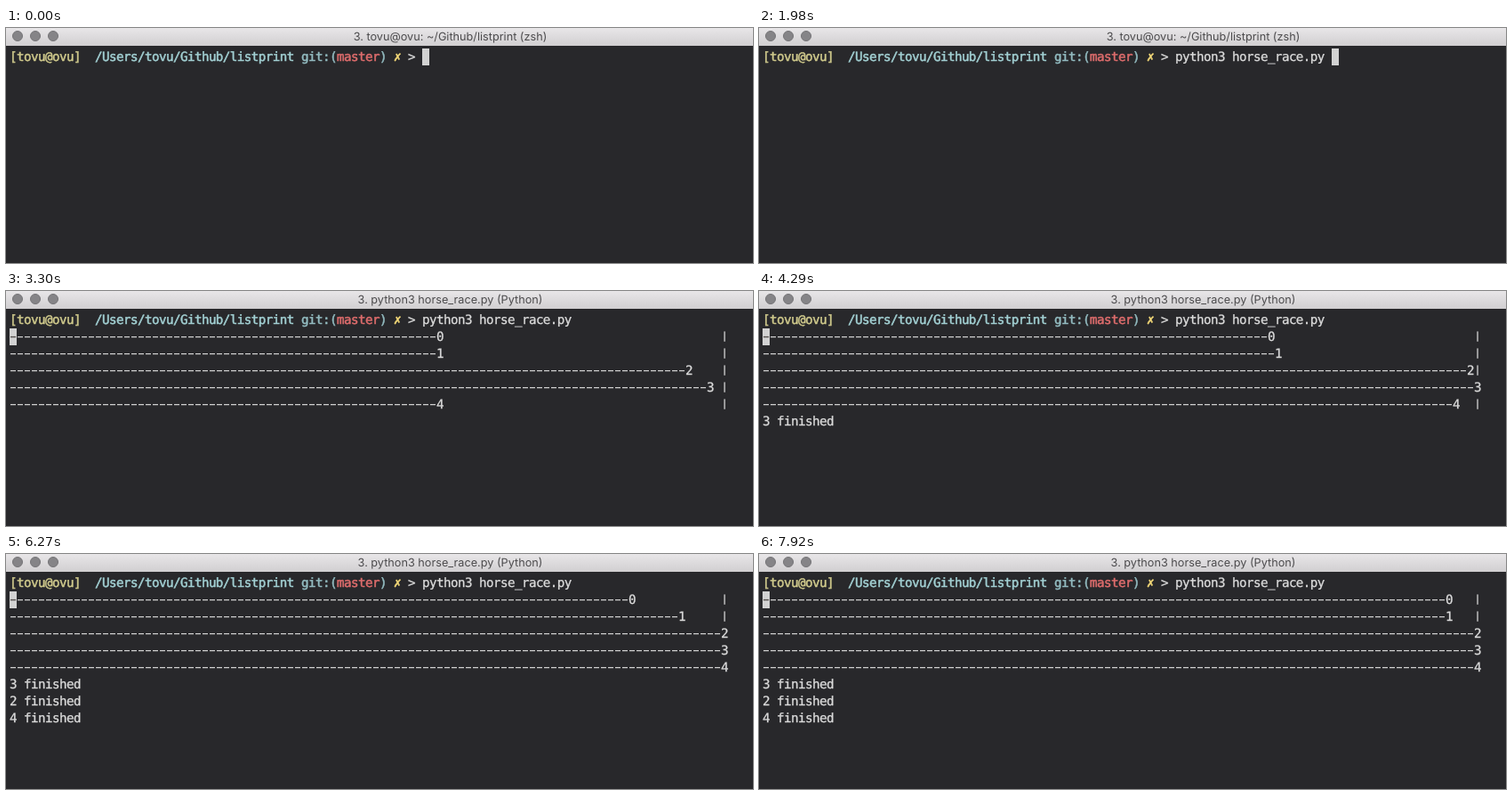
Recreate the animation shown at these times as an HTML page. Size 840 by 264 pixels, loop 8000 ms.

```html
<!DOCTYPE html>
<html lang="en">
<head>
<meta charset="utf-8">
<title>Horse race</title>
<style>
html, body { margin: 0; width: 100%; height: 100%; overflow: hidden; background: #28282b; }
svg { display: block; width: 840px; height: 264px; }
text { white-space: pre; text-rendering: geometricPrecision; }
.term text {
  font: 14.2px "DejaVu Sans Mono", "Noto Sans Mono", monospace;
  letter-spacing: -0.549px;
  fill: currentColor;
  stroke: currentColor;
  stroke-width: 0.3px;
  color: #dcdcdc;
}
.term .strong { stroke-width: 0.5px; }
.term .wall { font-size: 11px; letter-spacing: 0; text-anchor: middle; }
.title { font: 12.7px Inter, Roboto, sans-serif; fill: #4c4b4d; text-anchor: middle; }
</style>
</head>
<body>
<svg viewBox="0 0 840 264">
  <defs>
    <linearGradient id="bar" x2="0" y2="1">
      <stop offset="0" stop-color="#e8e6e8"/>
      <stop offset="1" stop-color="#d1cfd1"/>
    </linearGradient>
  </defs>
  <rect width="840" height="264" fill="#28282b"/>
  <rect width="840" height="20" fill="url(#bar)"/>
  <g id="buttons" fill="#858487" stroke="#757477"></g>
  <text id="title" class="title" x="499.5" y="14"></text>
  <g id="term" class="term"></g>
</svg>
<script>
const LOOP = 8000, CELL = 8, ROW = 19, LEFT = 4, TOP = 23;
const FINISH = 100, PROMPT_END = 58;
const USER = "tovu", HOST = "ovu";
const COMMAND = "python3 horse_race.py ";
const START = 2310;

// [time, characters typed]; the last step is a tab completion
const typing = [[0, 0], [660, 3], [990, 6], [1320, 8], [1650, 9], [1980, COMMAND.length]];

// [time, lane positions, horses home]
const race = [
  [3300, [60, 60, 95, 98, 60], 0],
  [4290, [71, 72, 99, 100, 97], 1],
  [5280, [79, 83, 100, 100, 99], 2],
  [6270, [87, 94, 100, 100, 100], 3],
  [7260, [96, 96, 100, 100, 100], 3]
];
const order = [3, 2, 4];

const $ = id => document.getElementById(id);
const colX = col => LEFT + CELL * col;
const baseline = row => TOP + ROW * row + 14;
const dashY = row => TOP + ROW * row + 9.6;
const latest = (steps, t) => steps.filter(step => step[0] <= t).pop();
const show = (el, on) => el.setAttribute("visibility", on ? "visible" : "hidden");

function add(parent, tag, attrs, content = "") {
  const el = document.createElementNS("http://www.w3.org/2000/svg", tag);
  for (const name in attrs) el.setAttribute(name, attrs[name]);
  el.textContent = content;
  return parent.appendChild(el);
}

function write(col, row, content, color) {
  const el = add($("term"), "text", { x: colX(col), y: baseline(row) }, content);
  if (color) {
    el.style.color = color;
    el.setAttribute("class", "strong");
  }
  return el;
}

for (const cx of [13, 33, 53]) add($("buttons"), "circle", { cx, cy: 9, r: 5.5 });

write(0, 0, `[${USER}@${HOST}]`, "#d0ca8c");
write(12, 0, `/Users/${USER}/Github/listprint`, "#a2d0d3");
write(41, 0, "git:(", "#93bcc1");
write(46, 0, "master", "#dd6c6c");
write(52, 0, ")", "#93bcc1");
write(54, 0, "✗", "#f1d777");
write(56, 0, ">");
const typed = write(PROMPT_END, 0, "");

const lanes = Array.from({ length: 5 }, (_, i) => {
  const row = i + 1;
  const trail = add($("term"), "path", {
    stroke: "#d0d0d0", "stroke-width": 1.4, "stroke-dasharray": "6 2"
  });
  const horse = write(0, row, i);
  const wall = add($("term"), "text", {
    class: "wall", x: colX(FINISH) + CELL / 2, y: baseline(row) - 2
  }, "|");
  return { y: dashY(row), trail, horse, wall };
});
const results = order.map((horse, i) => write(0, 6 + i, `${horse} finished`));
const cursor = add($("term"), "rect", { width: CELL, height: ROW, fill: "#d2d2d2" });
const underCursor = add($("term"), "path", {
  d: `M${LEFT + 1} ${dashY(1)}h6`, stroke: "#55504e", "stroke-width": 1.4
});

function draw(t) {
  const running = t >= START;
  const count = latest(typing, t)[1];
  const state = latest(race, t);

  $("title").textContent = running
    ? `3. ${COMMAND}(Python)`
    : `3. ${USER}@${HOST}: ~/Github/listprint (zsh)`;
  typed.textContent = COMMAND.slice(0, count);
  cursor.setAttribute("x", colX(running ? 0 : PROMPT_END + count));
  cursor.setAttribute("y", TOP + (running ? ROW : 0));
  show(underCursor, state);

  lanes.forEach(({ y, trail, horse, wall }, i) => {
    const pos = state ? state[1][i] : 0;
    trail.setAttribute("d", `M${LEFT + 1} ${y}H${colX(pos)}`);
    horse.setAttribute("x", colX(pos));
    show(trail, state);
    show(horse, state);
    show(wall, state && pos < FINISH);
  });
  results.forEach((line, i) => show(line, state && i < state[2]));
}

function tick() {
  draw(performance.now() % LOOP);
  requestAnimationFrame(tick);
}
tick();
</script>
</body>
</html>
```
